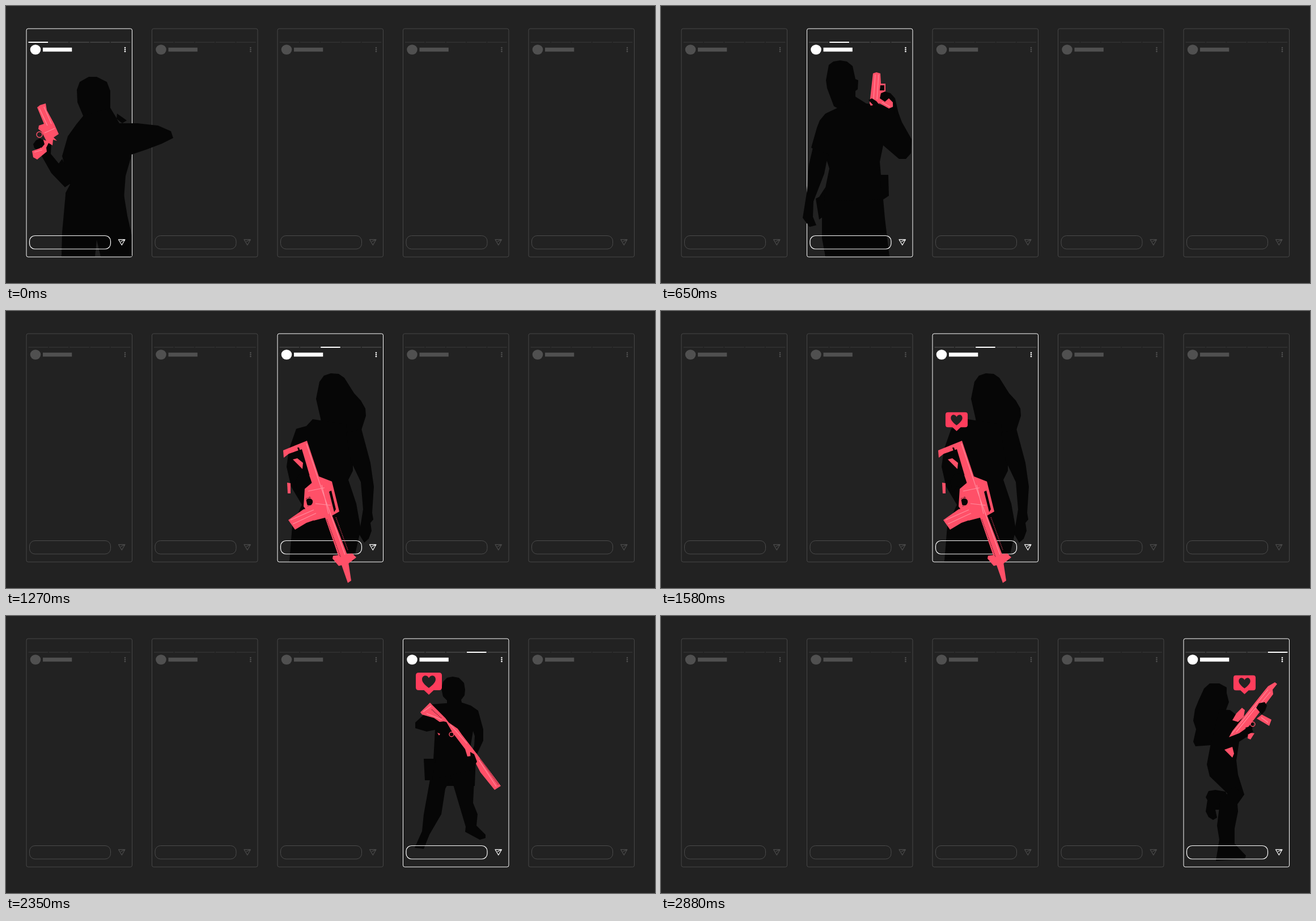
Animation, 1145 px wide and 489 px high, one loop 3.18 s. Source, as an HTML page:

```html
<!DOCTYPE html>
<html lang="en">
<head>
<meta charset="utf-8">
<title>Stories</title>
<style>
html, body { margin: 0; width: 100%; height: 100%; overflow: hidden; background: #222; }
svg { display: block; width: 100vw; height: 100vh; }
</style>
</head>
<body>
<svg id="stage" viewBox="0 0 1145 489"></svg>
<script>
const LOOP = 3180, PITCH = 221.5;
const BG = '#222', INK = '#060606', PINK = '#ff5068', LIGHT = '#ff8d9e', BUBBLE = '#ff3d5c';

const poly = (points, fill) => `<polygon points="${points}" fill="${fill}"/>`;
const stroke = (d, color, width = 1, extra = '') =>
  `<path d="${d}" fill="none" stroke="${color}" stroke-width="${width}" ${extra}/>`;
const polys = (parts, fill) => Object.values(parts).map(p => poly(p, fill)).join('');
const ring = (x, y, r) =>
  `<circle cx="${x}" cy="${y}" r="${r}" fill="none" stroke="${PINK}" stroke-width="1.4"/>`;

const raised = {
  start: 0, end: 380, tipX: 74.5, tipY: 157, size: 1,
  body: {
    head: '137,196 126,170 125,148 130,134 146,125 160,125 178,134 184,150 184,180 195,198 150,210',
    torso: '137,193 184,180 200,207 232,207 268,211 291,221 295,233 275,243 246,254 222,262 211,300 208,340 105,340 105,330 113,315 99,265 109,230 124,209',
    collar: '195,199 196,190 213,202 205,207',
    arm: '104,320 80,295 63,265 50,250 55,236 66,237 80,243 79,261 93,278 99,270 115,300 113,314',
    legs: '105,333 208,333 214,370 222,405 222,442 167,442 160,413 157,442 98,442 99,400'
  },
  gun: {
    barrel: '55,179 60,175 70,172 72,184 85,208 93,226 84,232 90,238 83,236 82,246 72,240 63,222 57,217 58,211 67,208',
    grip: '66,236 76,240 71,250 72,257 55,271 48,267 46,256 60,251'
  },
  shine: 'M59,181L73,211M67,178L80,208M68,224L86,216M50,258L64,254',
  guard: ring(59, 227, 5),
  hands: { fist: '48,244 53,237 60,234 66,237 68,244 63,250 50,251' }
};

const officer = {
  start: 650, end: 1040, tipX: 380, tipY: 106.5, size: .74,
  body: {
    head: '305,177 293,145 291,131 296,104 304,98 316,96 328,98 338,106 343,129 348,131 347,147 343,150 343,165 330,190',
    torso: '311,180 343,160 362,172 415,178 425,205 442,235 441,260 432,270 420,270 392,246 386,275 392,345 284,350 297,287 290,265 265,250 275,215 280,202 290,190',
    arm: '268,250 296,262 292,276 288,296 269,345 268,372 274,387 262,390 250,374 257,330 261,280',
    belt: '386,298 401,298 402,335 390,343',
    pouch: '273,340 279,337 290,320 286,372 279,377',
    legs: '284,345 392,341 395,375 403,442 290,442 284,410'
  },
  gun: {
    slide: '374,119 380,117 387,119 388,137 396,137 396,151 386,172 370,176 368,172',
    grip: '390,151 404,158 409,168 409,178 402,181 386,172'
  },
  shine: 'M378,121L375,164M384,121L381,165M390,170L404,178',
  hands: {
    guard: '387,140 394,140 394,149 386,149',
    fist: '386,163 388,154 395,151 405,154 413,163 420,194 412,190 409,170 402,163 395,169',
    thumb: '366,166 372,163 380,168 388,178 377,178'
  }
};

const hooded = {
  start: 1270, end: 1580, tipX: 521.5, tipY: 212, size: .85,
  body: {
    hood: '555,190 547,155 553,125 561,114 573,110 587,111 597,118 614,145 626,158 634,172 635,185 627,210 560,230',
    torso: '541,191 600,200 612,268 612,282 604,298 618,340 626,385 613,442 500,442 505,380 522,342 503,310 495,275 499,245 512,208 530,203',
    arm: '600,215 627,208 643,268 649,310 646,356 648,368 643,374 645,388 640,402 632,409 623,394 630,350 626,302 608,264'
  },
  gun: {
    stock: '489,246 531,229 552,292 540,305 522,244 499,252 490,259',
    receiver: '535,290 552,292 575,301 588,354 574,362 543,370 525,345 527,314 540,303',
    barrel: '562,362 575,360 602,430 609,476 603,480',
    sight: '576,437 577,432 611,428 618,435 604,446 587,450',
    magazine: '498,369 525,350 545,346 550,367 530,374 510,386',
    handle: '496,303 502,304 502,322 497,322',
    lever: '506,262 514,260 524,268 523,279'
  },
  shine: 'M530,234L556,312L598,430M502,369L543,351M506,376L547,357M533,318L562,312M546,340L573,343M557,307L569,358',
  ribs: 'M566,368L590,434M582,364L603,422',
  guard: ring(535, 337, 7),
  hands: {
    slot: '570,319 574,317 582,350 579,355',
    gap: '514,241 517,241 522,257 519,257',
    fist: '510,301 518,288 526,286 534,291 536,304 530,311 522,309 515,320',
    finger: '529,331 536,328 542,334 540,343 532,345'
  }
};

const guardsman = {
  start: 1920, end: 2350, tipX: 746, tipY: 139, size: 1,
  body: {
    head: '778,157 778,149 771,142 768,128 771,116 778,109 788,107 799,109 808,118 810,130 809,140 803,148 805,157',
    torso: '776,154 805,153 820,158 833,167 842,200 842,220 829,248 827,300 748,300 754,254 757,201 742,204 722,198 722,188 735,176 750,156',
    left: '748,289 788,281 775,305 768,350 747,386 737,411 721,409 734,380 737,350',
    right: '784,281 827,270 824,330 832,350 830,370 846,386 846,392 836,395 810,381 811,372 800,335',
    holster: '737,252 758,252 752,290 739,290'
  },
  gap: '824,203 827,212 826,229 823,237 820,228',
  gun: {
    stock: '731,170 748,153 775,180 781,188 772,186 765,187 755,180 734,174',
    action: '774,182 781,188 797,199 804,209 831,244 822,247 814,248 810,235 788,206',
    barrel: '822,234 831,244 873,300 862,307 837,276 822,247',
    chip: '761,206 766,208 764,211'
  },
  shine: 'M736,169L750,159M742,172L769,183M784,192L813,225M834,254L865,301',
  ribs: 'M836,252L869,298M751,165L769,181',
  guard: ring(786, 209, 4),
  hands: { fist: '819,240 826,244 831,257 826,266 820,257' }
};

const longHaired = {
  start: 2580, end: 2880, tipX: 1029.5, tipY: 138, size: .85,
  body: {
    hair: '968,119 985,119 998,126 998,136 1002,152 996,168 985,227 943,230 939,222 944,200 939,185 942,165 948,150 958,128',
    torso: '985,165 1004,166 1028,185 1046,178 1042,208 1020,222 1015,255 1018,280 1029,315 1017,332 996,310 968,283 963,262 969,230',
    shin: '996,310 978,307 966,309 961,320 964,325 961,345 966,355 974,360 981,356 978,342 1010,342',
    leg: '986,330 1010,300 1029,315 1017,332 1018,345 1012,375 1012,402 1032,423 1030,429 979,432 985,395 981,370'
  },
  gun: {
    rifle: '1002,214 1008,203 1066,130 1071,124 1083,117 1087,120 1079,130 1080,138 1037,195 1020,207',
    magazine: '1051,181 1060,174 1077,183 1073,194',
    scope: '1008,184 1015,172 1025,162 1030,166 1028,178 1018,187',
    grip: '1036,206 1047,207 1040,218 1035,216',
    stock: '994,236 1008,231 1011,243 1008,250'
  },
  shine: 'M1007,208L1071,130M1015,205L1051,160M1059,179L1071,188M1049,165L1075,134',
  guard: ring(1044, 191, 4),
  hands: {
    front: '1050,162 1055,154 1065,152 1069,158 1066,167 1060,174',
    rear: '1031,197 1040,195 1045,204 1036,209'
  }
};

const stories = [raised, officer, hooded, guardsman, longHaired];

function frame(x, active, on) {
  const line = on ? '#fff' : '#474747', fill = on ? '#fff' : '#505050';
  let out = `<rect x="36" y="40" width="186.5" height="403" rx="3" fill="none" stroke="${line}"/>`;
  for (let i = 0; i < 5; i++) {
    const left = 39.5 + i * 36.3, lit = on && i === active;
    out += stroke(`M${left},64h34.7`, lit ? '#fff' : on ? '#5a5a5a' : '#3a3a3a', lit ? 1.8 : 1);
  }
  out += `<ellipse cx="52" cy="77" rx="9.3" ry="8.7" fill="${fill}"/>
    <rect x="65" y="73.5" width="51.3" height="7" fill="${fill}"/>`;
  for (let i = -1; i < 2; i++) out += `<circle cx="210" cy="${77 + i * 3.3}" r="1.3" fill="${fill}"/>`;
  return `<g transform="translate(${x})">${out}</g>`;
}

function footer(x, on) {
  const color = on ? '#fff' : '#4b4b4b';
  return `<g transform="translate(${x})">
    <rect x="41.5" y="405.5" width="143" height="23.5" rx="9.5" fill="none" stroke="${color}" stroke-width="${on ? 1.2 : 1}"/>
    ${stroke('M198.5,412.3H210L204.3,422ZM202.4,416L210,412.3', color, 1.2, 'stroke-linejoin="round"')}</g>`;
}

// Drawn with the tip of the speech bubble at the origin.
const bubbleShape = `<path fill="${BUBBLE}" d="M-18,-39H18Q23,-39 23,-34V-13Q23,-8 18,-8H8.5L0,0L-8.5,-8H-18Q-23,-8 -23,-13V-34Q-23,-39 -18,-39Z"/>
  <path fill="${BG}" d="M0,-12C-4,-15 -12,-21 -12,-27C-12,-35 -3,-36 0,-29.5C3,-36 12,-35 12,-27C12,-21 4,-15 0,-12Z"/>`;

const person = s => polys(s.body, INK) + (s.gap ? poly(s.gap, BG) : '');
const weapon = s => polys(s.gun, PINK) + stroke(s.shine, LIGHT, 1.1) +
  (s.ribs ? stroke(s.ribs, '#8f2c3c', 1.5, 'stroke-dasharray="2 1"') : '') +
  polys(s.hands, INK) + (s.guard || '');

const stage = document.getElementById('stage');
stage.innerHTML = `<rect width="1145" height="489" fill="${BG}"/>` +
  stories.map((s, i) => {
    const x = i * PITCH;
    return `<g class="idle">${frame(x, i, false)}${footer(x, false)}</g>`;
  }).join('') +
  stories.map((s, i) => {
    const x = i * PITCH;
    return `<g class="live">${frame(x, i, true)}${person(s)}${footer(x, true)}${weapon(s)}
      <g class="bubble">${bubbleShape}</g></g>`;
  }).join('');

const [idle, live, bubbles] = ['.idle', '.live', '.bubble'].map(q => [...stage.querySelectorAll(q)]);

function easeOutBack(p) {
  const c = .8, q = p - 1;
  return 1 + (c + 1) * q ** 3 + c * q ** 2;
}

function render(t) {
  const current = stories.findLastIndex(s => t >= s.start);
  stories.forEach((s, i) => {
    const on = i === current;
    idle[i].style.display = on ? 'none' : '';
    live[i].style.display = on ? '' : 'none';
    if (!on) return;
    const begin = s.start + 30;
    const p = Math.min(1, Math.max(0, (t - begin) / (s.end - begin)));
    const e = easeOutBack(p);
    bubbles[i].style.display = t < s.start + 40 ? 'none' : '';
    bubbles[i].setAttribute('transform',
      `translate(${s.tipX},${s.tipY + 95 * s.size * (1 - e)}) scale(${s.size * e})`);
  });
}

const origin = performance.now();
function tick() {
  render((performance.now() - origin) % LOOP);
  requestAnimationFrame(tick);
}
tick();
</script>
</body>
</html>
```
